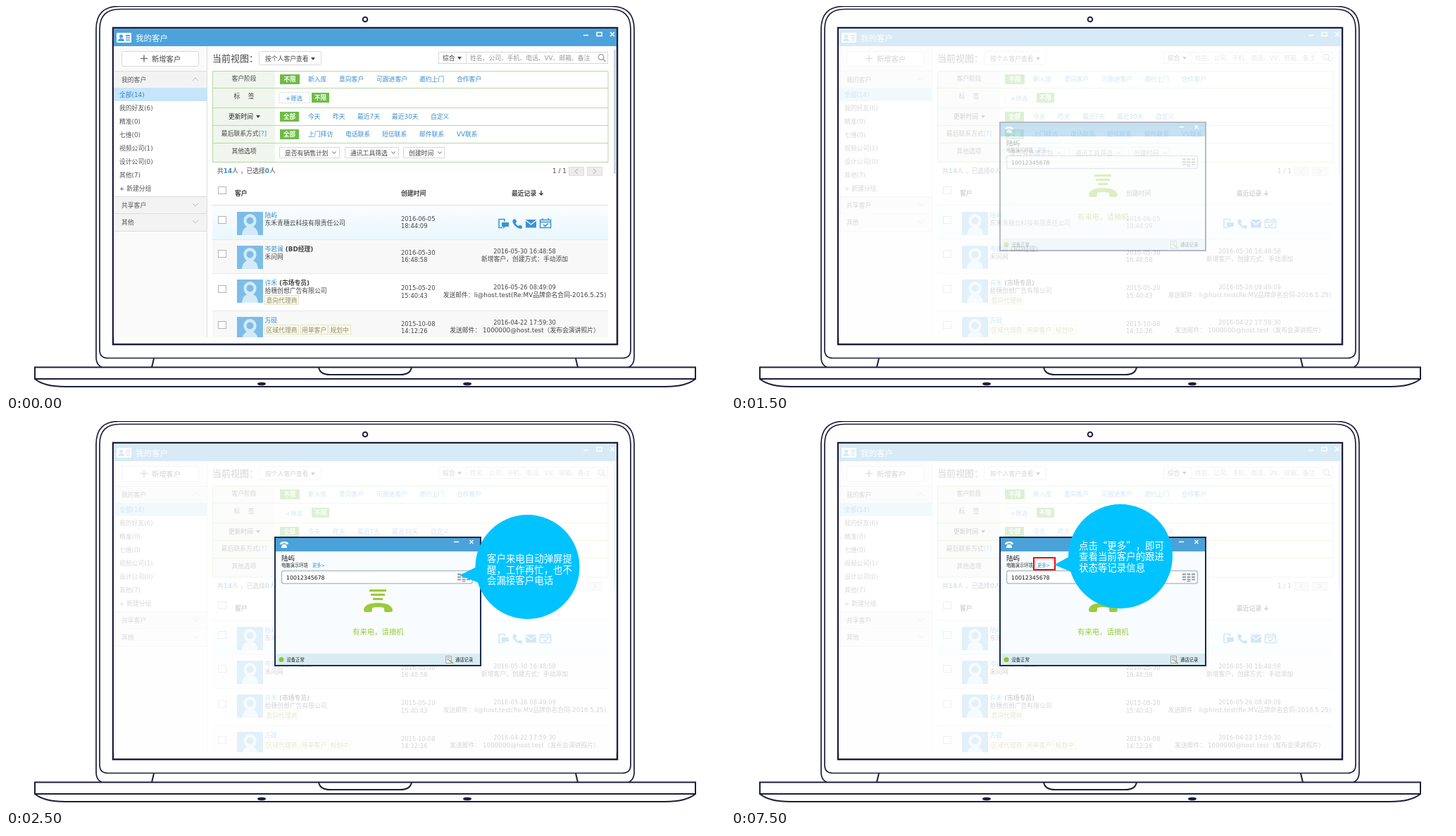
An HTML page for the animation above (8 s loop, 1021 by 549 pixels).

```html
<!DOCTYPE html>
<html lang="zh-CN">
<head>
<meta charset="utf-8">
<title>来电弹屏</title>
<style>
html, body { margin: 0; width: 100%; height: 100%; overflow: hidden; background: #fff; }
svg { display: block; width: 1021px; height: 549px; }
text { font: 8.8px "DejaVu Sans", "Noto Sans CJK SC", "Noto Sans CJK", sans-serif; fill: #444; white-space: pre; text-spacing-trim: space-all; }
.num text, text.num { font-size: 8.35px; }
.mid text { text-anchor: middle; }
.link text, text.link, .link { fill: #3a8cc9; }
.side text { fill: #555; }
.tag text { fill: #8c8a68; }
.bold { font-weight: bold; }
.white { fill: #fff; }
.line { fill: none; stroke: #1e1e3c; stroke-width: 2; }
.thin { fill: none; stroke: #ddd; }
.green { fill: #6cbd45; }
.on text { fill: #fff; font-weight: bold; font-size: 8.6px; }
.box { fill: #fff; stroke: #d8d8d8; }
.tip text { font: 13.45px "Noto Sans CJK SC", "Noto Sans CJK", sans-serif; fill: #fff; }
.tip { fill: #00c3ff; }
.tiny { font-size: 6.3px; font-weight: 500; fill: #222; }
.fade { opacity: 0; animation: 8s step-end infinite; }
#veil { animation-name: veil; }
#call { animation-name: call; }
#tip1 { animation-name: tip1; }
#mark { animation-name: mark; }
#tip2 { animation-name: tip2; }
@keyframes veil { 0% { opacity: 0 } 13.75% { opacity: .28 } 15% { opacity: .54 } 16.25%, 100% { opacity: .78 } }
@keyframes call { 0% { opacity: 0 } 18.75% { opacity: .32 } 20% { opacity: .55 } 21.25% { opacity: .78 } 22.5%, 100% { opacity: 1 } }
@keyframes tip1 { 0% { opacity: 0 } 28.75% { opacity: .33 } 30% { opacity: .67 } 31.25% { opacity: 1 } 68.75%, 100% { opacity: 0 } }
@keyframes mark { 0% { opacity: 0 } 78.75%, 100% { opacity: 1 } }
@keyframes tip2 { 0% { opacity: 0 } 91.25% { opacity: .33 } 92.5% { opacity: .67 } 93.75%, 100% { opacity: 1 } }
</style>
</head>
<body>
<svg viewBox="0 0 1021 549">
<defs>
  <clipPath id="screen"><path d="M153 32H867V470H153Z"/></clipPath>
  <linearGradient id="hover" x2="0" y2="1"><stop stop-color="#fafdff"/><stop offset="1" stop-color="#eaf7fe"/></linearGradient>
  <g id="check"><rect x=".5" y=".5" width="11" height="10" fill="#fff" stroke="#b5b5b5"/></g>
  <path id="chev" d="M-4 -2L0 2L4 -2" fill="none" stroke="#bbb"/>
  <path id="drop" d="M-3 -2H3L0 2Z" fill="#444"/>
  <path id="pick" d="M-2.5 -1.5L0 1.5L2.5 -1.5" fill="none" stroke="#666"/>
  <g id="face">
    <path d="M0 0H37V33H0Z" fill="#7cbde8"/>
    <path d="M7 33Q8 23 14 21.5Q9 17 9.500 12A9 9 0 0 1 27.500 12Q28 17 23 21.5Q29 23 30 33Z" fill="#d3eaf8"/>
    <circle cx="18.500" cy="12.500" r="5" fill="#7cbde8"/>
  </g>
</defs>

<g class="line">
  <path d="M136 512.500Q128 509 128 498V33Q128 .5 160.500 .5H859.500Q892 .5 892 33V498Q892 509 884 512.500" stroke-width="1.700"/>
  <path d="M145 499.500Q133 499.500 133 488V33Q133 4.500 161.500 4.500H858.500Q887 4.500 887 33V488Q887 499.500 875 499.500Z" stroke-width="1.700"/>
  <circle cx="510" cy="19" r="3.300"/>
  <path d="M210 500L207 512.500M809 500L812 512.500"/>
  <path d="M41 512.500H979V529H41ZM41 529Q54 540 84 540H936Q966 540 979 529"/>
  <path d="M444 512.500Q446 523 460 523H560Q574 523 576 512.500"/>
  <path d="M152 31H868V480H152Z" stroke-width="2.500"/>
</g>
<g fill="#1e1e3c"><ellipse cx="363" cy="536" rx="6" ry="2.300"/><ellipse cx="655" cy="536" rx="6" ry="2.300"/></g>

<g clip-path="url(#screen)">
  <path d="M153 32H867V57H153Z" fill="#4ca3db"/>
  <rect x="157" y="38" width="21" height="14" rx="1" class="white"/>
  <g fill="#4ca3db"><circle cx="163.500" cy="43" r="2.600"/><path d="M159 50Q159 46 163.500 46T168 50ZM170 41h6v2h-6zM170 44.500h6v1.500h-6zM170 47.500h6v1.500h-6z"/></g>
  <text x="184" y="49.500" class="white" style="font-size:11.500px">我的客户</text>
  <path d="M820 41.500H827M839 37.500H846V42.500H839ZM858 37L864 43M864 37L858 43" fill="none" stroke="#fff" stroke-width="1.500"/>

  <path d="M153 57H285V471H153Z" fill="#fafafa"/>
  <path d="M153 92H285V116H153ZM153 270H285V319H153Z" fill="#f3f3f3"/>
  <path d="M153 116H285V135H153Z" fill="#c6e5fa"/>
  <path d="M153 135H285V270H153Z" fill="#fff"/>
  <path class="thin" d="M153 92.500H285M153 270.500H285M153 294.500H285M153 319.500H285M285.500 57V471"/>
  <rect class="box" x="164.500" y="64.500" width="109" height="21" rx="2"/>
  <path d="M191 74.500H201M196 69.500V79.500" stroke="#777" stroke-width="1.500"/>
  <text x="207" y="78.500" style="font-size:10.300px">新增客户</text>
  <use href="#chev" transform="matrix(1 0 0 -1 269 104)"/><use href="#chev" x="269" y="282"/><use href="#chev" x="269" y="306"/>
  <g class="side">
    <text x="164" y="107.500">我的客户</text>
    <text x="161" y="128.500" style="fill:#2f83c4">全部(14)</text>
    <text x="161" y="147.500">我的好友(6)</text>
    <text x="161" y="166.500">精准(0)</text>
    <text x="161" y="186">七维(0)</text>
    <text x="161" y="205">视频公司(1)</text>
    <text x="161" y="224">设计公司(0)</text>
    <text x="161" y="243">其他(7)</text>
    <text x="161" y="262">+ 新建分组</text>
    <text x="164" y="285.500">共享客户</text>
    <text x="164" y="309.500">其他</text>
  </g>

  <text x="293" y="79" style="font-size:13px">当前视图：</text>
  <rect class="box" x="359.500" y="64.500" width="88" height="19" rx="2"/>
  <text x="368" y="77.500">按个人客户查看</text><use href="#drop" x="436" y="75"/>
  <rect class="box" x="614.500" y="65.500" width="240" height="16"/>
  <path class="thin" d="M653.500 66V81"/>
  <text x="620" y="76.500">综合</text><use href="#drop" x="644" y="74"/>
  <text x="659" y="76.500" style="fill:#999">姓名、公司、手机、电话、VV、邮箱、备注</text>
  <g fill="none" stroke="#999" stroke-width="1.300"><circle cx="845" cy="72.500" r="3.800"/><path d="M848 75.500L851.500 79"/></g>
  <path d="M863 62H867V238H863Z" fill="#cbd5dd"/>

  <path d="M293 92H382V221H293Z" fill="#f0f6ee"/>
  <path d="M293.500 92.500H855V221.500H293.500ZM293 116.500H855M293 144.500H855M293 169.500H855M293 194.500H855" fill="none" stroke="#b4daa0"/>
  <g class="mid">
    <text x="338" y="105.500">客户阶段</text><text x="338" y="130.500">标　 签</text>
    <text x="333.500" y="159.500" style="fill:#222">更新时间</text><text x="338" y="184">最后联系方式<tspan class="link">[?]</tspan></text><text x="338" y="208.500">其他选项</text>
  </g>
  <use href="#drop" x="358" y="157"/>
  <path class="green" d="M389 97h28v14h-28zM434 123h25v14h-25zM389 150h27v14h-27zM389 175h27v14h-27z"/>
  <g class="on mid"><text x="403" y="107">不限</text><text x="446.500" y="133">不限</text><text x="402.500" y="160">全部</text><text x="402.500" y="185">全部</text></g>
  <rect x="388.500" y="122.500" width="43" height="15" fill="#fff" stroke="#ccc" stroke-dasharray="2"/>
  <g class="link">
    <text x="429" y="107">新入库</text><text x="473" y="107">意向客户</text><text x="526" y="107">可跟进客户</text><text x="587" y="107">邀约上门</text><text x="640" y="107">合作客户</text>
    <text x="397" y="133.500" style="font-size:8.500px">+筛选</text>
    <text x="429" y="160">今天</text><text x="464" y="160">昨天</text><text x="499" y="160">最近7天</text><text x="548" y="160">最近30天</text><text x="603" y="160">自定义</text>
    <text x="429" y="185">上门拜访</text><text x="482" y="185">电话联系</text><text x="534" y="185">短信联系</text><text x="587" y="185">邮件联系</text><text x="640" y="185">VV联系</text>
  </g>
  <path class="box" d="M388.500 200.500h85v15h-85zM481.500 200.500h76v15h-76zM564.500 200.500h58v15h-58z"/>
  <text x="396" y="211.500">是否有销售计划</text><text x="489" y="211.500">通讯工具筛选</text><text x="572" y="211.500">创建时间</text>
  <use href="#pick" x="466" y="208"/><use href="#pick" x="550" y="208"/><use href="#pick" x="616" y="208"/>

  <text x="300" y="237">共<tspan class="link bold">14</tspan>人 ，已选择<tspan class="link bold">0</tspan>人</text>
  <text x="776" y="237">1 / 1</text>
  <path d="M799.500 228.500h21v12h-21zM825.500 228.500h21v12h-21z" fill="#ececec" stroke="#ddd"/>
  <path d="M812 231L808 234.500L812 238M834 231L838 234.500L834 238" fill="none" stroke="#aaa"/>

  <text x="325" y="268.500" class="bold">客户</text><text x="561" y="268.500" class="bold">创建时间</text><text x="718" y="268.500" class="bold">最近记录</text>
  <path d="M760 262V268M757.500 265.500L760 268L762.500 265.500" fill="none" stroke="#333" stroke-width="1.300"/>
  <path d="M293 283H855V331H293Z" fill="url(#hover)"/>
  <path d="M293 331H855V379H293ZM293 432H855V471H293Z" fill="#f8f8f8"/>
  <path class="thin" d="M293 282.500H855" stroke="#ccc"/><path class="thin" d="M293 331.500H855M293 379.500H855M293 432.500H855" style="stroke:#e8e8e8"/>
  <use href="#check" x="301" y="256"/><use href="#check" x="301" y="298"/><use href="#check" x="301" y="346"/><use href="#check" x="301" y="396"/><use href="#check" x="301" y="447"/>
  <use href="#face" x="328" y="292"/><use href="#face" x="328" y="340"/><use href="#face" x="328" y="388"/><use href="#face" x="328" y="441"/>

  <text x="367.500" y="299.500" class="link">陆屿</text><text x="367.500" y="310.500">东禾青穗云科技有限责任公司</text>
  <text x="367.500" y="347.500" class="link">岑若澜 <tspan class="bold" fill="#444">(BD经理)</tspan></text><text x="367.500" y="358.500">禾问网</text>
  <text x="367.500" y="395.500" class="link">许禾 <tspan class="bold" fill="#444">(市场专员)</tspan></text><text x="367.500" y="406.500">拾穗创想广告有限公司</text>
  <text x="367.500" y="448.500" class="link">方砚</text>
  <path d="M367.500 410.500h48v13h-48zM367.500 452.500h48v13h-48zM418.500 452.500h38v13h-38zM458.500 452.500h31v13h-31z" fill="#fdfcec" stroke="#e6e2c0"/>
  <g class="tag"><text x="369.500" y="420.500">意向代理商</text><text x="369.500" y="462.500">区域代理商</text><text x="420" y="462.500">用单客户</text><text x="460.500" y="462.500">规划中</text></g>

  <g class="num">
    <text x="561" y="304.500">2016-06-05</text><text x="561" y="315">18:44:09</text>
    <text x="561" y="352.500">2016-05-30</text><text x="561" y="363">16:48:58</text>
    <text x="561" y="403">2015-05-20</text><text x="561" y="413.500">15:40:43</text>
    <text x="561" y="453.500">2015-10-08</text><text x="561" y="464">14:12:26</text>
  </g>
  <g class="mid num">
    <text x="736.500" y="351">2016-05-30 16:48:58</text><text x="736.500" y="401.500">2016-05-26 08:49:09</text><text x="736.500" y="452">2016-04-22 17:59:30</text>
  </g>
  <g class="mid">
    <text x="736.500" y="362">新增客户，创建方式：手动添加</text>
    <text x="736.500" y="412.500">发送邮件：li@host.test(Re:MV品牌命名合同-2016.5.25)</text>
    <text x="736.500" y="463">发送邮件： 1000000@host.test（发布会演讲照片）</text>
  </g>

  <g fill="#3a93d4">
    <path d="M708 306V302.500H700V314.500H705" fill="none" stroke="#3a93d4" stroke-width="1.500"/>
    <path d="M704 307H714V313H709L706 316V313H704Z"/>
    <path d="M720 303L723 302L725.500 306L723.500 308Q725 311 728 312L730 310.500L733.500 313L732 316Q727 316 722.500 311.500T720 303Z"/>
    <path d="M738 303H753V314.500H738Z"/>
    <path d="M738 304L745.500 310L753 304" fill="none" stroke="#fff" stroke-width="1.300"/>
    <path d="M758.500 303.500H773.500V314.500H758.500ZM758 306.500H774M762 301V304M770 301V304M763 310L765.500 312.500L770 308.500" fill="none" stroke="#3a93d4" stroke-width="1.500"/>
  </g>
</g>

<path id="veil" class="fade" d="M153 32H867V471H153Z" fill="#fff"/>

<g id="call" class="fade">
  <path d="M382 165H674V347H382Z" fill="#f8fcfe"/>
  <path d="M382 165H674V185H382Z" fill="#4ba2d9"/>
  <path d="M382 330H674V347H382Z" fill="#d9ecf3"/>
  <path d="M382 165H674V347H382Z" fill="none" stroke="#1b2c4e" stroke-width="2"/>
  <path d="M389 175Q389 171 395 171T401 175H397.500V173.500H392.500V175ZM391 180Q391 176 393.500 175H396.500Q399 176 399 180Z" class="white"/>
  <path d="M636 171.500H643M658.500 169L663.500 174M663.500 169L658.500 174" stroke="#fff" stroke-width="1.300"/>
  <text x="391" y="198" style="font-size:9.600px;fill:#222">陆屿</text>
  <text x="391" y="206.500" class="tiny">电脑演示环境</text><text x="435" y="206.500" class="tiny" style="fill:#2e94d6">更多&gt;</text>
  <rect x="391.500" y="212.500" width="271" height="18" rx="3" fill="#fff" stroke="#afc0ca" stroke-width="1.500"/>
  <text x="398" y="225" style="font-size:7.800px;font-weight:500;fill:#111">10012345678</text>
  <path d="M641 217.500H659M641 221.500H659" fill="none" stroke="#9aa5ab" stroke-width="2.500" stroke-dasharray="5 1.500"/>
  <path d="M641 225H659" stroke="#9aa5ab" stroke-width="2" stroke-dasharray="5 1.500"/><path d="M647.500 227.500H652.500" stroke="#9aa5ab" stroke-width="1.500"/>
  <g fill="#9bca3c">
    <path d="M516 239H540V242H516ZM518 245H538V248H518ZM521 251H535V254H521Z"/>
    <path d="M508 268Q509 258 528 258T549 268Q549 271 546 271H539Q537 271 537 268V265Q528 263 520 265V268Q520 271 518 271H511Q508 271 508 268Z"/>
  </g>
  <text x="492" y="302.500" style="font-size:10.400px;fill:#9bca3c;font-weight:500">有来电，请摘机</text>
  <circle cx="391" cy="338.500" r="3.500" fill="#8fc720"/>
  <text x="398.500" y="341" class="tiny">设备正常</text>
  <path d="M624.500 333.500H632.500V343.500H624.500Z" fill="#eef3f5" stroke="#9aa8ae"/>
  <path d="M626 336H631M626 338.500H629" stroke="#8d9aa0"/><path d="M629 339L635 344" stroke="#a9b860" stroke-width="2"/>
  <text x="638" y="341" class="tiny" style="font-weight:400">通话记录</text>
</g>

<g id="tip1" class="fade tip">
  <circle cx="740.500" cy="207" r="74"/><path d="M644 219L670 206V229Z"/>
  <text x="683" y="199.500">客户来电自动弹屏提</text><text x="683" y="215.500">醒，工作再忙，也不</text><text x="683" y="231">会漏接客户电话</text>
</g>
<rect id="mark" class="fade" x="430" y="194" width="30" height="17" fill="none" stroke="#f00" stroke-width="2"/>
<g id="tip2" class="fade tip">
  <circle cx="553" cy="192" r="74"/><path d="M459 204L483 191V214Z"/>
  <text x="494" y="181.500">点击“更多”，即可</text><text x="494" y="197">查看当前客户的跟进</text><text x="494" y="213">状态等记录信息</text>
</g>
</svg>
</body>
</html>
```
